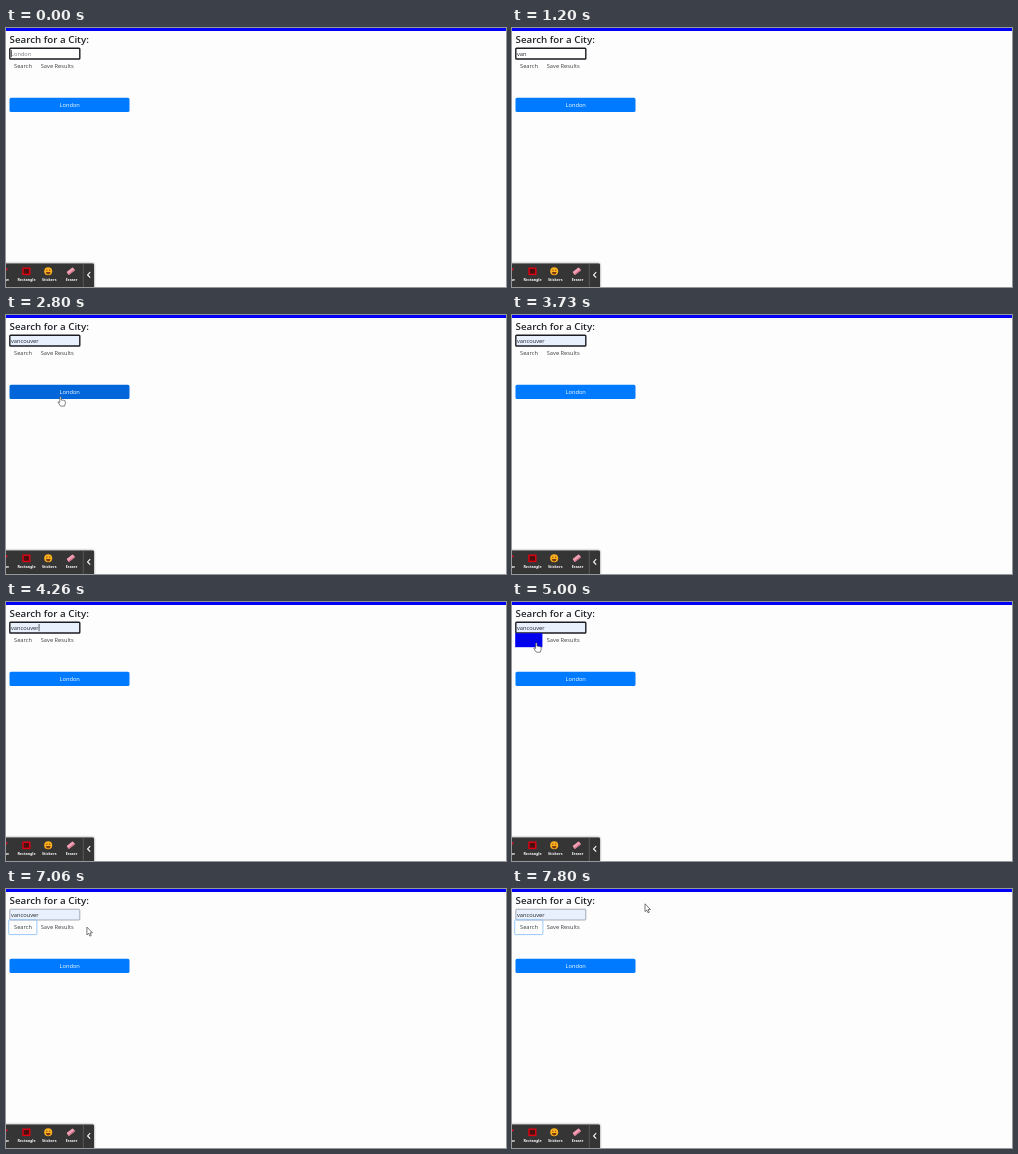
Recreate the animation shown at these times as an HTML page. Size 500x259 px, loop 8000 ms.

```html
<!DOCTYPE html>
<html lang="en">
<head>
<meta charset="utf-8">
<title>City search</title>
<style>
  html, body { margin: 0; width: 100%; height: 100%; overflow: hidden; background: #fdfdfd; }
  svg { display: block; width: 500px; height: 259px; }
  text { font-family: "Open Sans", "Noto Sans", sans-serif; font-size: 5.7px; fill: #3c4045; }
  .mid { text-anchor: middle; }
  .title { font-size: 9.75px; font-weight: 600; fill: #212529; }
  .tool { font-size: 3.7px; font-weight: 700; fill: #fff; text-anchor: middle; }
</style>
</head>
<body>
<svg viewBox="0 0 500 259">
  <defs>
    <filter id="shade" x="-10%" y="-30%" width="125%" height="160%">
      <feDropShadow dx="0" dy="0" stdDeviation="1.2" flood-opacity=".5"/>
    </filter>
  </defs>
  <rect width="500" height="259" fill="#fdfdfd"/>
  <rect width="500" height="3" fill="#0000f4"/>
  <text class="title" x="3.6" y="14.8">Search for a City:</text>

  <rect id="field" x="3.8" y="20.2" width="70" height="10.8" rx=".8"/>
  <text id="value" x="5" y="27.7"></text>
  <rect id="caret" y="22" width=".7" height="7.2" fill="#222"/>

  <rect id="ring" x="2.7" y="30.8" width="28.2" height="14.8" rx=".8" fill="none" stroke="#8fc4fb" stroke-width=".9"/>
  <rect id="search" x="3.2" y="31.2" width="27.2" height="14" fill="#0000f0"/>
  <text id="searchText" class="mid" x="17" y="40">Search</text>
  <text class="mid" x="51.2" y="40">Save Results</text>

  <rect id="city" x="3.5" y="69.8" width="120" height="14.2" rx="1.6"/>
  <text class="mid" x="63.7" y="79" style="fill:#fff">London</text>

  <g>
    <rect x="-4" y="235.5" width="92" height="28" rx="1.2" fill="#343434" filter="url(#shade)"/>
    <path d="M77.3 236V259" stroke="#686868" stroke-width=".7"/>
    <path d="M84.2 244.2L81.6 246.9L84.2 249.6" fill="none" stroke="#fff" stroke-width="1.1"/>
    <path d="M-2 244L1.4 240.4" stroke="#d8102a" stroke-width="1.5"/>
    <rect x="17" y="240.2" width="6.8" height="6.2" fill="#4a1010" stroke="#e00012" stroke-width="1.4"/>
    <circle cx="42.2" cy="243.3" r="4" fill="#fbb01e"/>
    <path d="M39.8 244H44.6Q44 246.6 42.2 246.6T39.8 244Z" fill="#7a3b10"/>
    <path d="M40.2 242.2h1.2M43 242.2h1.2" stroke="#6b3510" stroke-width=".9"/>
    <g transform="translate(64.8 243.2) rotate(-38)">
      <rect x="-4" y="-1.9" width="8" height="3.8" rx=".9" fill="#f3a0b4"/>
      <rect x="-4" y=".7" width="8" height="1.2" rx=".5" fill="#cf7189"/>
    </g>
    <text class="tool" x="-2.6" y="253.2">Arrow</text>
    <text class="tool" x="20.5" y="253.2">Rectangle</text>
    <text class="tool" x="43.2" y="253.2">Stickers</text>
    <text class="tool" x="65.6" y="253.2">Eraser</text>
  </g>

  <g id="arrow" fill="#fff" stroke="#333" stroke-width=".65" stroke-linejoin="round">
    <path d="M0 0V7.8L1.8 6.2L3 9L4.3 8.4L3.1 5.7H5.5Z"/>
  </g>
  <g id="hand" fill="#fff" stroke="#333" stroke-width=".6" stroke-linejoin="round">
    <path d="M0 .6Q.7-.4 1.4.6V3.6Q2.2 2.9 2.8 3.8Q3.6 3.2 4.2 4.1Q5.4 3.7 5.5 5V7.2L4.7 9.6H.8L-1.6 6.2Q-1.9 5 -.8 5.3L0 6Z"/>
  </g>
</svg>
<script>
  const LOOP = 8000, STEP = 1000 / 15;
  const $ = id => document.getElementById(id);
  const [field, value, caret, ring, search, searchText, city, arrow, hand] =
    ['field', 'value', 'caret', 'ring', 'search', 'searchText', 'city', 'arrow', 'hand'].map($);

  // Pointer path: time, x, y
  const path = [
    [1200, 24, 28], [1660, 43, 34], [1800, 43, 34], [1933, 46, 32],
    [2600, 53.8, 81.5], [2800, 53.8, 81.5], [3060, 38, 26], [4270, 32, 26],
    [4800, 23.6, 40.6], [6667, 23.6, 40.6], [7130, 84, 38], [7330, 84, 38], [7800, 133, 14.8]
  ];
  const texts = [[0, ''], [60, 'v'], [130, 'va'], [260, 'van'], [1530, 'vancouver']];
  const caretOn = [[0, 800], [1860, 2390], [2920, 3600], [4130, 4660], [5190, 5260]];
  const HOVER = 4600, CLICK = 5260, LEAVE = 6700, FADE = 150;

  const clamp = v => Math.max(0, Math.min(1, v));
  const ease = v => v * v * (3 - 2 * v);
  const within = (t, a, b) => t >= a && t < b;
  const show = (el, on) => el.setAttribute('visibility', on ? 'visible' : 'hidden');

  function pointer(t) {
    const i = path.findIndex(p => p[0] > t);
    if (i === 0) return null;
    if (i < 0) return path[path.length - 1].slice(1);
    const [t0, x0, y0] = path[i - 1], [t1, x1, y1] = path[i];
    const k = ease((t - t0) / (t1 - t0));
    return [x0 + (x1 - x0) * k, y0 + (y1 - y0) * k];
  }

  function draw(t) {
    const typed = texts.filter(s => s[0] <= t).pop()[1];
    const focused = t < CLICK;
    value.textContent = typed || 'London';
    value.style.fill = typed ? '#212529' : '#777c82';
    field.setAttribute('fill', t >= 1530 ? '#e8f0fe' : '#fff');
    field.setAttribute('stroke', focused ? '#1c1c22' : '#858a96');
    field.setAttribute('stroke-width', focused ? 1.4 : .7);
    show(caret, caretOn.some(([a, b]) => within(t, a, b)));
    caret.setAttribute('x', typed ? 5.2 + value.getComputedTextLength() : 4.9);

    const glow = clamp((t - HOVER) / FADE) * (1 - clamp((t - LEAVE) / FADE));
    search.setAttribute('opacity', glow);
    searchText.style.fill = glow > .5 ? '#0808c8' : '#3c4045';
    ring.setAttribute('opacity', clamp((t - CLICK) / FADE));

    const p = pointer(t);
    const onCity = !!p && p[1] >= 70 && p[1] < 84;
    const onSearch = within(t, HOVER, LEAVE);
    const inField = !!p && p[0] < 74 && p[1] > 20 && p[1] < 31;
    city.setAttribute('fill', onCity ? '#0066da' : '#007bff');
    show(hand, onCity || onSearch);
    show(arrow, !!p && !onCity && !onSearch && !inField);
    if (p) {
      const size = within(t, 1800, 2100) ? 1.35 : 1;
      hand.setAttribute('transform', `translate(${p})`);
      arrow.setAttribute('transform', `translate(${p}) scale(${size})`);
    }
  }

  function tick() {
    const t = performance.now() % LOOP;
    draw(Math.floor((t + 7) / STEP) * STEP);
    requestAnimationFrame(tick);
  }
  tick();
</script>
</body>
</html>
```
